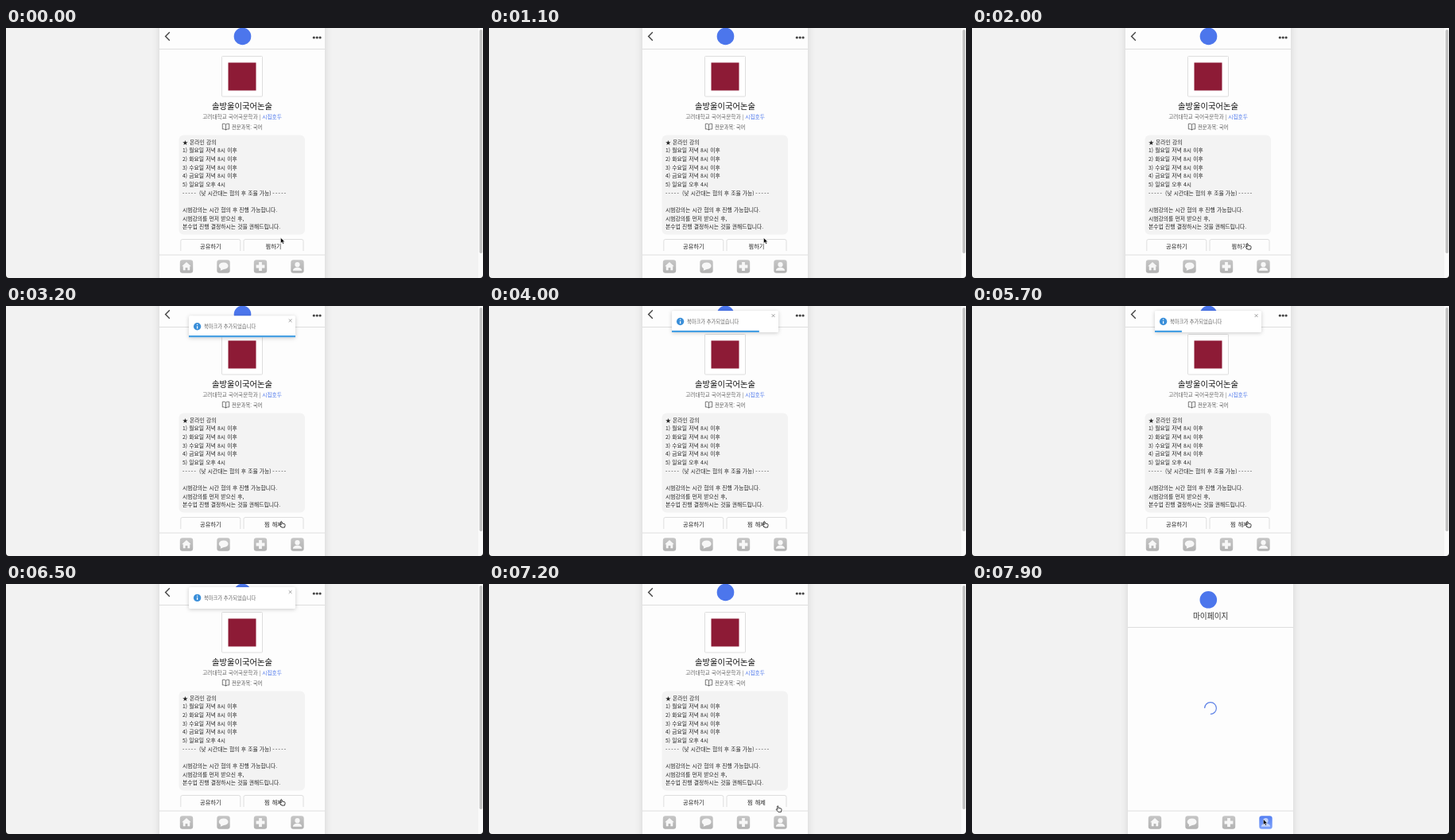
Animation, 600 px wide and 314 px high, one loop 8000 ms. Source, as an HTML page:

```html
<!DOCTYPE html>
<html lang="ko">
<head>
<meta charset="utf-8">
<title>Bookmark toast</title>
<style>
  html, body { margin: 0; width: 100%; height: 100%; overflow: hidden; background: #f2f2f2; }
  svg { display: block; width: 100%; height: 100%; }
  text { font-family: "Noto Sans CJK KR", "Noto Sans CJK", "Noto Sans", sans-serif; fill: #222; white-space: pre; }
  .mid { text-anchor: middle; }
  .line { stroke: #dedede; stroke-width: 1; fill: none; }
  .body { font-size: 6.8px; word-spacing: .3px; }
  .phone { filter: drop-shadow(0 0 5px rgba(0, 0, 0, .13)); }
  .toast { filter: drop-shadow(0 1px 2.5px rgba(0, 0, 0, .2)); }
</style>
</head>
<body>
<svg id="stage" viewBox="0 0 600 314"></svg>
<script>
const LOOP = 8000, SCALE = 134 / 320;
const CLICK = 2750, ENTER = 2770, BAR = 3460, LEAVE = 6460, SWITCH = 7500;

const label = (x, y, size, str, extra = '') =>
  `<text x="${x}" y="${y}" font-size="${size}" ${extra}>${str}</text>`;

const glyphs = [
  '<path d="M0-5.6L5.8-.2H4.2V4.8H1.4V1.4H-1.4V4.8H-4.2V-.2H-5.8Z"/>',
  '<path d="M0-4.9C8-4.9 8 3.4 .5 3.6L-3.8 5.2L-3.4 2.8C-8-.2-5.2-4.9 0-4.9Z"/>',
  '<path d="M-1.9-5.4H1.9V-1.9H5.4V1.9H1.9V5.4H-1.9V1.9H-5.4V-1.9H-1.9Z"/>',
  '<circle cy="-2.3" r="3.1"/><path d="M-5.6 5.2C-5.6 0 5.6 0 5.6 5.2Z"/>'
];

const nav = (left, active) => `<path class="line" d="M${left} 285H${left + 208}"/>` +
  glyphs.map((g, i) => {
    const on = i === active;
    return `<g transform="translate(${left + 34 + i * 46.5} 299.5)">
      <rect x="-8.2" y="-8.2" width="16.4" height="16.4" rx="3.2" fill="url(#${on ? 'blue' : 'grey'})"/>
      <g fill="${on ? '#c3d3fb' : '#f7f7f7'}">${g}</g></g>`;
  }).join('');

const phone = left => `<rect class="phone" x="${left}" y="-12" width="208" height="340" fill="#fdfdfd"/>`;

const days = ['월요일 저녁 8시 이후', '화요일 저녁 8시 이후', '수요일 저녁 8시 이후', '금요일 저녁 8시 이후', '일요일 오후 4시'];
const lines = ['★ 온라인 강의', ...days.map((d, i) => `${i + 1}) ${d}`), '', '',
  '시범강의는 시간 협의 후 진행 가능합니다.', '시범강의를 먼저 받으신 후,', '본수업 진행 결정하시는 것을 권해드립니다.'];
const row = i => 145.8 + i * 10.66;
const dashes = x => label(x, row(6), 6.8, '-----', 'letter-spacing="1.25"');

const button = (x, id, str) =>
  `<path class="line" d="M${x} 280V267.5Q${x} 265.5 ${x + 2} 265.5H${x + 73}Q${x + 75} 265.5 ${x + 75} 267.5V280"/>` +
  label(x + 37.5, 276.5, 7.2, str, `id="${id}" class="mid" word-spacing="1"`);

const profile = `<g id="profile">
  ${phone(193)}
  <path class="line" d="M193 26.5H401"/>
  <path d="M205.8 5.3L200.6 10.5L205.8 15.7" fill="none" stroke="#444" stroke-width="1.4"/>
  <g fill="#444"><circle cx="387.3" cy="12" r="1.6"/><circle cx="391.2" cy="12" r="1.6"/><circle cx="395.1" cy="12" r="1.6"/></g>
  <circle cx="297.5" cy="10.4" r="10.8" fill="#4c76ec"/>
  <rect x="271.5" y="35.5" width="51" height="50.5" rx="1" fill="#fff" stroke="#dedede"/>
  <rect x="279.5" y="43.5" width="35" height="35" fill="#8d1b36"/>
  ${label(297, 102.4, 10.3, '솔방울이국어논술', 'class="mid" font-weight="500" style="fill:#111"')}
  ${label(297, 114, 6.7, '<tspan fill="#666">고려대학교 국어국문학과 | </tspan><tspan fill="#4c76ec">시집호두</tspan>', 'class="mid"')}
  <path d="M276.5 121.2V128M276.5 121.2Q274.5 119.6 272.3 120.4V127Q274.5 126.4 276.5 128Q278.5 126.4 280.7 127V120.4Q278.5 119.6 276.5 121.2" fill="none" stroke="#555" stroke-width=".8"/>
  ${label(284, 126.9, 6.3, '전문과목: 국어', 'style="fill:#555"')}
  <rect x="217.5" y="134.5" width="158.5" height="125" rx="6" fill="#f3f3f3"/>
  ${lines.map((s, i) => `<text class="body" x="222" y="${row(i)}">${s}</text>`).join('')}
  <text class="body" x="243" y="${row(6)}">(낮 시간대는 협의 후 조율 가능)</text>
  ${dashes(222)}${dashes(335.3)}
  ${button(219.8, 'share', '공유하기')}${button(299, 'mark', '찜하기')}
  ${nav(193)}
  <rect x="594" width="6" height="314" fill="#fafafa"/>
  <rect x="595.6" y="2" width="3.6" height="281" rx="1.8" fill="#c1c1c1"/>
</g>`;

const myPage = `<g id="mypage">
  ${phone(196)}
  <circle cx="297.3" cy="19.8" r="10.8" fill="#4c76ec"/>
  ${label(300.2, 44.4, 9.7, '마이페이지', 'class="mid" style="fill:#333"')}
  <path class="line" d="M196 54.5H404"/>
  <path id="spin" d="M-7.4 0A7.4 7.4 0 1 1 0 7.4" fill="none" stroke="#5c80e6" stroke-width="1.2"/>
  ${nav(196, 3)}
</g>`;

const toast = `<g id="toast">
  <rect class="toast" x="230" y="6" width="134" height="27" rx="1.5" fill="#fff"/>
  <circle cx="240.6" cy="19.5" r="4.7" fill="#3b8fd9"/>
  <path d="M240.6 18.9V22.2M240.6 16.6V17.8" stroke="#fff" stroke-width="1.2"/>
  ${label(249, 21.7, 6.28, '북마크가 추가되었습니다', 'style="fill:#666"')}
  <path d="M355.7 10.2L359.5 14M359.5 10.2L355.7 14" stroke="#888" stroke-width=".8"/>
  <rect id="bar" x="230" y="30.8" height="2.2" fill="#459fe3"/>
</g>`;

const cursor = `<g id="arrow"><path d="M0 0V6.6L1.6 5.2L2.7 7.7L3.9 7.2L2.8 4.8H4.9Z" fill="#000" stroke="#fff" stroke-width=".4"/></g>
<g id="hand"><path d="M-.7 .7Q0-.4 .7 .7L1.1 2.8L3.8 3.3Q5 3.7 4.8 5L4.2 7.8H.6L-1.9 4.9Q-2.1 3.9-.9 4.2L-.1 4.8Z" fill="#fff" stroke="#111" stroke-width=".8" stroke-linejoin="round"/></g>`;

const gradient = (id, top, bottom) => `<linearGradient id="${id}" x2="0" y2="1">
  <stop stop-color="${top}"/><stop offset="1" stop-color="${bottom}"/></linearGradient>`;

document.getElementById('stage').innerHTML = `<defs>${gradient('grey', '#c6c6c6', '#b2b2b2')}${gradient('blue', '#5580f2', '#7ea2fa')}</defs>
  <rect width="600" height="314" fill="#f2f2f2"/>
  ${profile}${myPage}${toast}${cursor}
  <path d="M0 310Q0 314 4 314H0ZM600 310Q600 314 596 314H600Z" fill="#111"/>`;

const $ = id => document.getElementById(id);
const show = (id, on) => { $(id).style.display = on ? '' : 'none'; };
const move = (id, x, y) => $(id).setAttribute('transform', `translate(${x} ${y})`);
const clamp = v => Math.min(1, Math.max(0, v));

const bezier = (x1, y1, x2, y2) => x => {
  const at = (a, b, s) => 3 * a * s * (1 - s) ** 2 + 3 * b * s * s * (1 - s) + s ** 3;
  let lo = 0, hi = 1;
  for (let i = 0; i < 24; i++) {
    const m = (lo + hi) / 2;
    if (at(x1, x2, m) < x) lo = m; else hi = m;
  }
  return at(y1, y2, lo);
};
const bounce = bezier(.215, .61, .355, 1), ease = bezier(.25, .1, .25, 1), linear = p => p;

// Piecewise interpolation of [position, value] keys
function track(keys, p, fn) {
  if (p <= keys[0][0]) return keys[0][1];
  for (let i = 1; i < keys.length; i++) {
    const [a, from] = keys[i - 1], [b, to] = keys[i];
    if (p < b) return from + (to - from) * fn((p - a) / (b - a));
  }
  return keys[keys.length - 1][1];
}

const dropIn = [[0, -3000], [.6, 25], [.75, -10], [.9, 5], [1, 0]];
const flyOut = [[0, 0], [.2, -10], [.4, 20], [.45, 20], [1, -2000]];
const cursorX = [[1100, 345.6], [1300, 346.3], [7100, 346.3], [7200, 363.2], [7350, 366.5]];
const cursorY = [[1100, 263.6], [1300, 270.3], [7100, 270.3], [7200, 278.4], [7350, 295.6]];

function draw(t) {
  const switched = t >= SWITCH;
  show('profile', !switched);
  show('mypage', switched);
  $('mark').textContent = t < CLICK ? '찜하기' : '찜 해제';
  $('spin').setAttribute('transform', `translate(300 156) rotate(${(t - 7900) / 750 * 360})`);

  show('toast', t >= ENTER && t < LEAVE + 700);
  const enter = clamp((t - ENTER) / 700), leave = clamp((t - LEAVE) / 700);
  const y = leave ? track(flyOut, leave, ease) : track(dropIn, enter, bounce);
  move('toast', 0, y * SCALE);
  $('toast').setAttribute('opacity', leave
    ? track([[.45, 1], [1, 0]], leave, ease) : track([[0, 0], [.6, 1]], enter, bounce));
  $('bar').setAttribute('width', 134 * (1 - clamp((t - BAR) / (LEAVE - BAR))));

  const x = track(cursorX, t, linear), cy = track(cursorY, t, linear);
  const pointing = !switched && cy >= 266;
  show('hand', pointing);
  show('arrow', !pointing);
  move('hand', x, cy);
  move('arrow', x, cy);
}

const start = performance.now();
function tick() {
  draw((performance.now() - start) % LOOP);
  requestAnimationFrame(tick);
}
tick();
</script>
</body>
</html>
```
